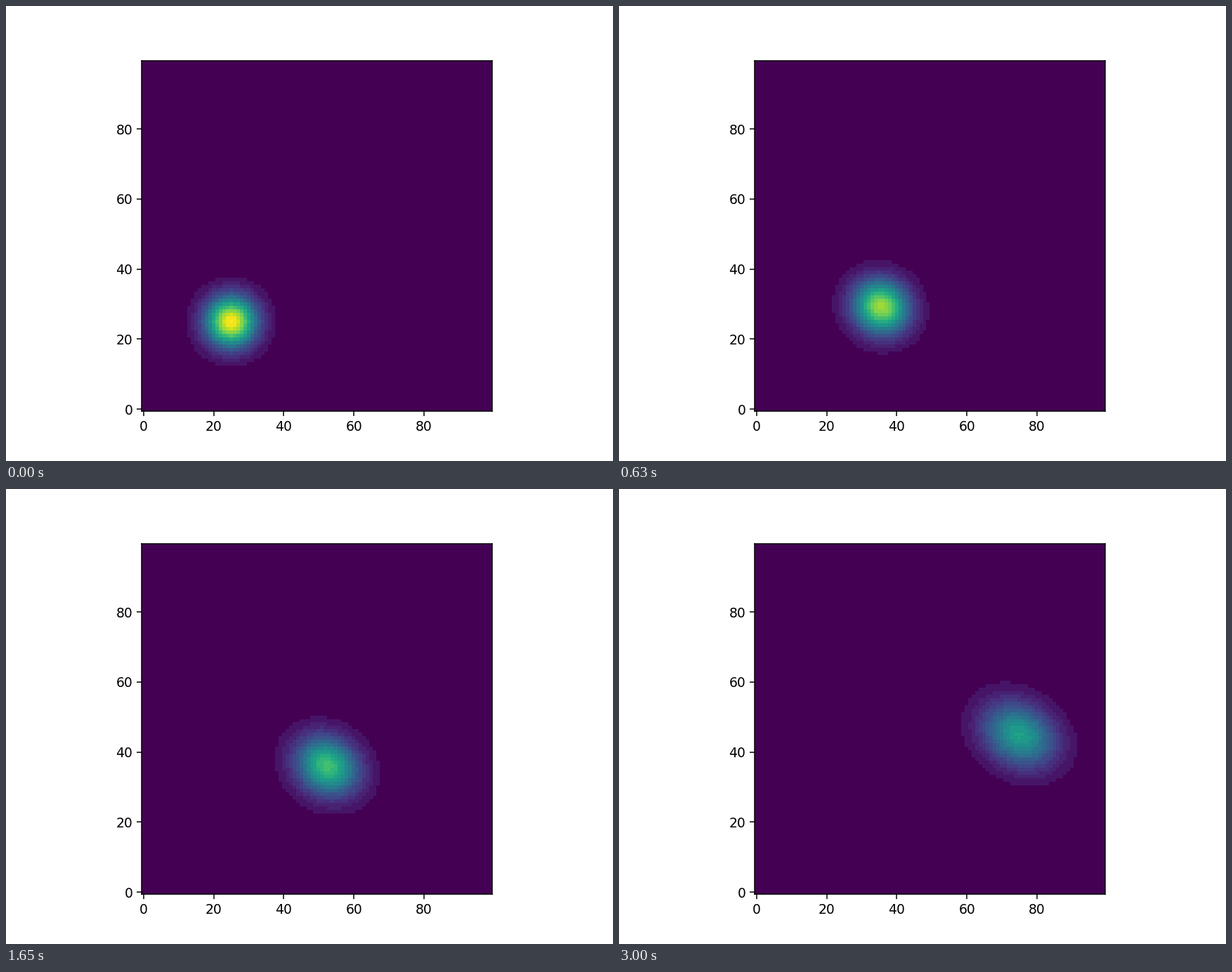
Recreate the animation shown at these times as a matplotlib script. Size 864 by 648 pixels, loop 3030 ms.

```python
import numpy as np
import matplotlib.pyplot as plt
from matplotlib.animation import FuncAnimation

N = 100            # grid cells per side
FRAMES = 101
INTERVAL = 30      # ms
CX, CY = 0.5, 0.2  # Courant numbers
SIGMA = 5.0
FLOOR, STEP = 0.0375, 0.04


def upwind(u):
    """One first-order upwind advection step on a periodic grid."""
    return (u - CX * (u - np.roll(u, 1, axis=1))
              - CY * (u - np.roll(u, 1, axis=0)))


def banded(u):
    """Group values into flat colour bands above a cut-off."""
    mid = FLOOR + STEP * (np.floor((u - FLOOR) / STEP) + 0.5)
    return np.where(u < FLOOR, 0.0, np.minimum(mid, 1.0))


y, x = np.mgrid[:N, :N]
states = [np.exp(-((x - 25) ** 2 + (y - 25) ** 2) / (2 * SIGMA ** 2))]
for _ in range(FRAMES - 1):
    states.append(upwind(states[-1]))

fig, ax = plt.subplots(figsize=(6.4, 4.8), dpi=135)
image = ax.imshow(banded(states[0]), origin="lower", cmap="viridis",
                  vmin=0, vmax=1, interpolation="nearest")


def update(i):
    image.set_data(banded(states[i]))
    return (image,)


anim = FuncAnimation(fig, update, frames=FRAMES, interval=INTERVAL,
                     repeat=True, repeat_delay=0)
plt.show()
```
